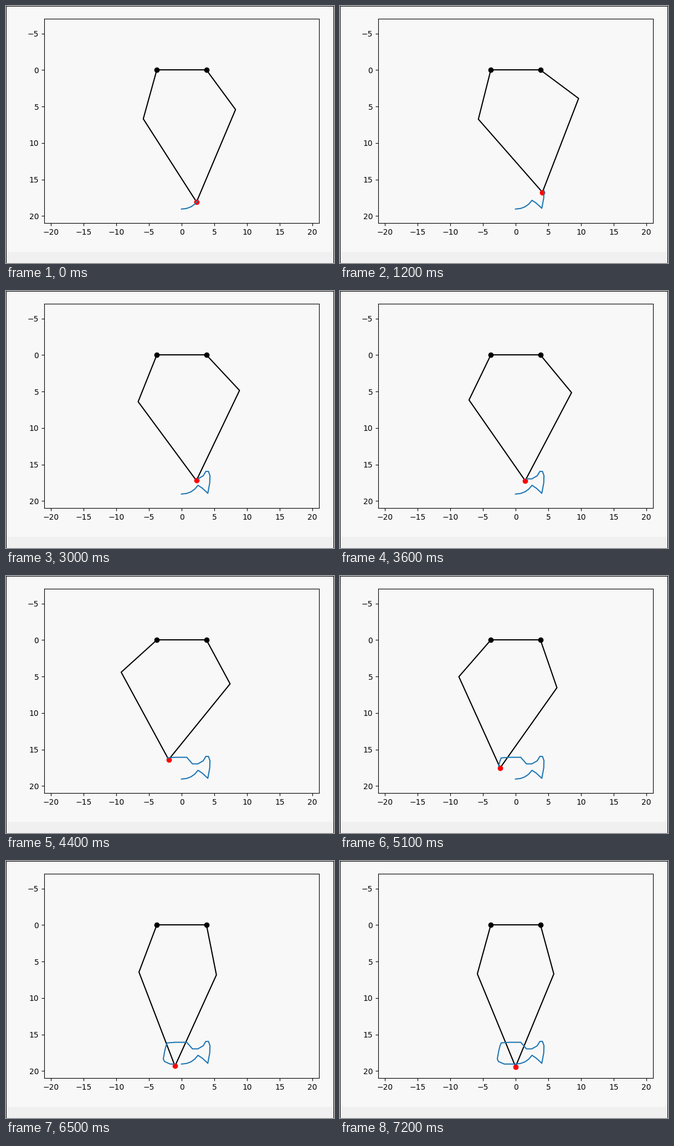
Write a matplotlib script that moves like this. It is 592x463 px and loops after 8.4 s.

```python
import numpy as np
import matplotlib.pyplot as plt
from matplotlib.animation import FuncAnimation
from matplotlib.patches import Rectangle

W, H, DPI = 592, 463, 100
STEP, LOOP = 100, 8400          # ms
HIP, UPPER, LOWER = 3.8, 7.0, 14.0
LEAD = 5                        # outline points already passed at the start


def bezier(steps, *ctrl):
    """Points along a Bezier curve of any degree, without its first point."""
    t = np.linspace(0, 1, steps + 1)[1:, None]
    pts = [np.array(c, float) for c in ctrl]
    while len(pts) > 1:
        pts = [a + (b - a) * t for a, b in zip(pts, pts[1:])]
    return pts[0]


def fish():
    home = (-.02, 19.05)
    pts = np.array([home])

    def go(steps, *ctrl):
        nonlocal pts
        pts = np.vstack([pts, bezier(steps, pts[-1], *ctrl)])

    go(4, (1.6, 19.05), (2.5, 17.85))       # belly
    go(2, (3.11, 18.12), (4, 18.95))        # tail
    go(3, (4.64, 16.5), (4.1, 15.95))
    go(1, (3.7, 15.95))
    go(2, (3.3, 16.55))
    go(2, (2.48, 17.18), (1.65, 16.97))
    go(1, (.78, 16.07))                     # back
    go(2, (-1.2, 16.03), (-2.2, 16.15))
    go(3, (-2.48, 16.52), (-2.8, 18.35))    # head
    go(2, (-2.98, 18.7), (-1.75, 19.05))
    go(3, home)
    return pts


def sag(target):
    """Where the loose arms really hold the pen: lower and nearer the middle."""
    x, y = target
    s = np.tanh(x / 1.5)
    return np.array([x - .24 * s, y + .37 - .15 * abs(s)])


def elbow(side, end):
    """Outer elbow of the left (-1) or right (1) arm reaching for end."""
    dx, dy = end[0] - side * HIP, end[1]
    dist = np.hypot(dx, dy)
    bend = np.arccos((UPPER**2 + dist**2 - LOWER**2) / (2 * UPPER * dist))
    a = np.arctan2(dy, dx) - side * bend
    return side * HIP + UPPER * np.cos(a), UPPER * np.sin(a)


PATH = fish()

fig = plt.figure(figsize=((W + 1e-6) / DPI, (H + 1e-6) / DPI), dpi=DPI,
                 facecolor="#f8f8f8")


def pixel_box(x, y, w, h, color):
    fig.add_artist(Rectangle((x, H - y - h), w, h, transform=None,
                             facecolor=color, edgecolor="none", lw=0,
                             antialiased=False))


# toolbar strip and window frame
pixel_box(0, 443, W, 20, "#f0f0f0")
pixel_box(0, 0, W, 1, "black")
pixel_box(0, 0, 1, H, "black")
pixel_box(W - 1, 0, 1, H, "black")

ax = fig.add_axes([69 / W, 71.58 / H, 496 / W, 368.06 / H],
                  facecolor="#f8f8f8")
ax.set(xlim=(-21, 21), ylim=(21, -7),
       xticks=range(-20, 21, 5), yticks=range(-5, 21, 5))

ax.plot([-HIP, HIP], [0, 0], "k-o")
links, = ax.plot([], [], "k-")
pen, = ax.plot([], [], "ro")
trace, = ax.plot([], [], color="C0")


def update(frame):
    # a new pose about every 350 ms, then a rest on the closed outline
    seen = min((2 * frame + 4) // 7 + LEAD, len(PATH))
    end = sag(PATH[seen - 1])
    joints = [(-HIP, 0), elbow(-1, end), end, elbow(1, end), (HIP, 0)]
    links.set_data(*np.array(joints).T)
    pen.set_data([end[0]], [end[1]])
    trace.set_data(*PATH[:seen].T)
    return links, pen, trace


anim = FuncAnimation(fig, update, frames=LOOP // STEP, interval=STEP,
                     repeat=True, repeat_delay=0)
plt.show()
```
